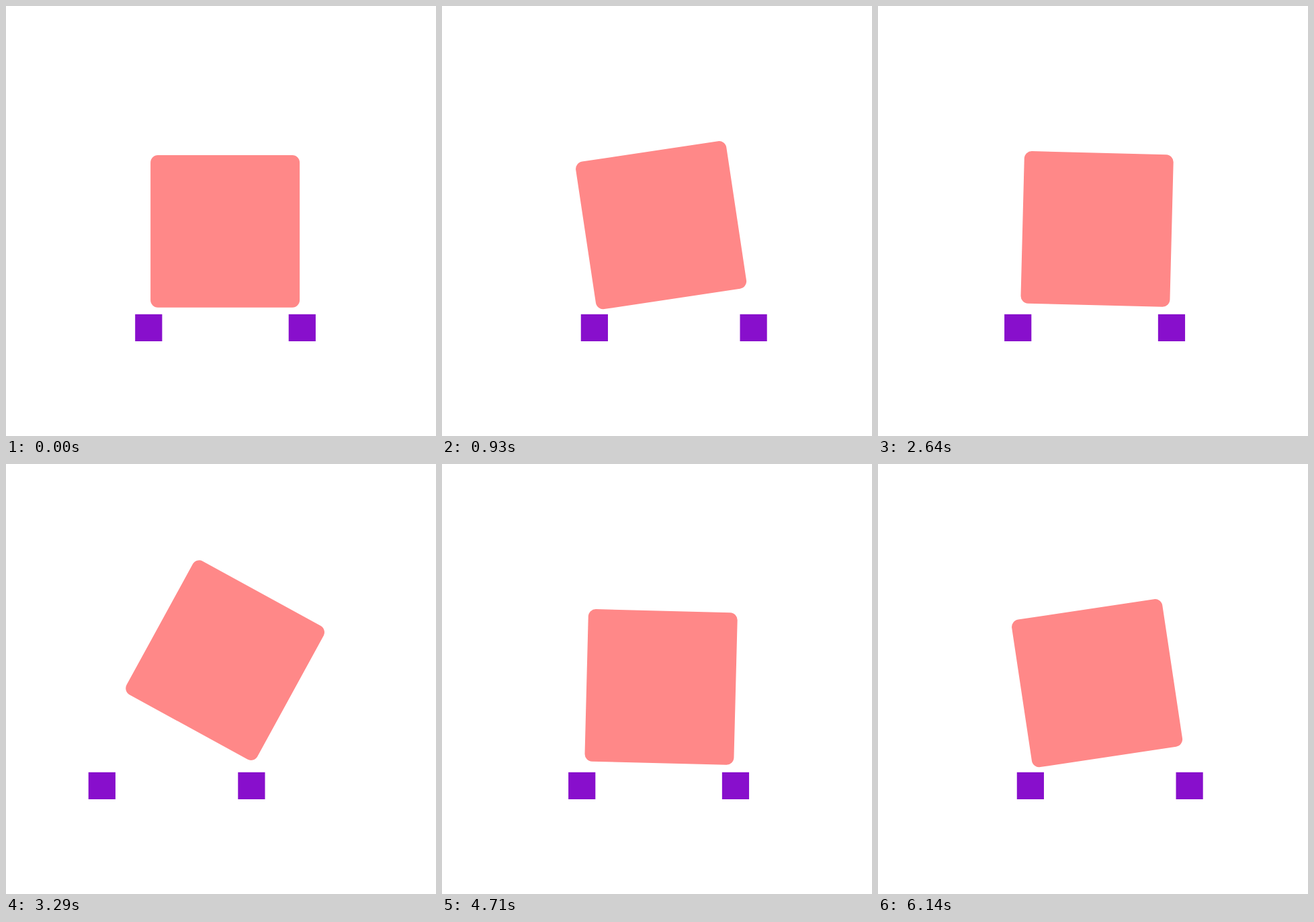
Write an HTML page that moves like this. It is 640 px wide and 640 px high and loops after 6210 ms.

```html
<!DOCTYPE html>
<html lang="en">
<head>
<meta charset="utf-8">
<title>Rolling square</title>
<style>
  html, body { margin: 0; width: 100%; height: 100%; overflow: hidden; background: #fff; }
  svg { display: block; width: 100%; height: 100%; }
</style>
</head>
<body>
<svg viewBox="0 0 640 640">
  <g fill="#880fcc">
    <rect class="block" y="458.8" width="40.2" height="40.2"/>
    <rect class="block" y="458.8" width="40.2" height="40.2"/>
    <rect class="block" y="458.8" width="40.2" height="40.2"/>
  </g>
  <rect id="roller" x="-111" y="-113.3" width="222" height="226.6" rx="11" fill="#ff8888"/>
</svg>
<script>
const LOOP_MS = 6210;
const SHOWN_FPS = 14;
const DRAWN_FPS = 25;
const ROLL_STEPS = 13;
const PEAK_STEP = 6;

const roller = document.getElementById('roller');
const blocks = document.querySelectorAll('.block');

// Each block eases between two places; it is shown for steps first to last.
const slides = [
  { from: 192.2, to: 73, start: 0, end: 9, first: 0, last: 8 },
  { from: 420.7, to: 192.2, start: 0, end: 13, first: 0, last: 12 },
  { from: 535.7, to: 420.7, start: 6, end: 13, first: 7, last: 12 },
];

function ease(step, start, end) {
  const u = Math.min(1, Math.max(0, (step - start) / (end - start)));
  return u * u * (3 - 2 * u);
}

// The motion is drawn at 25 steps per second and shown at 14, on a 10 ms clock.
function stepAt(ms) {
  const tick = Math.floor((ms % LOOP_MS) / 10) * 10;
  const shown = Math.floor((tick + 5) * SHOWN_FPS / 1000);
  return Math.floor((shown + 0.5) * DRAWN_FPS / SHOWN_FPS) % ROLL_STEPS;
}

function draw(step) {
  const angle = 87 * ease(step, 0, ROLL_STEPS);
  const lift = 46.7 * (step <= PEAK_STEP
    ? ease(step, 0, PEAK_STEP)
    : 1 - ease(step, PEAK_STEP, ROLL_STEPS));
  roller.setAttribute('transform', `translate(326.1 ${335.4 - lift}) rotate(${angle})`);

  slides.forEach((s, i) => {
    const shown = step >= s.first && step <= s.last;
    blocks[i].setAttribute('visibility', shown ? 'visible' : 'hidden');
    blocks[i].setAttribute('x', s.from + (s.to - s.from) * ease(step, s.start, s.end));
  });
}

const startTime = performance.now();
function tick() {
  draw(stepAt(Math.max(0, performance.now() - startTime)));
  requestAnimationFrame(tick);
}
tick();
</script>
</body>
</html>
```
